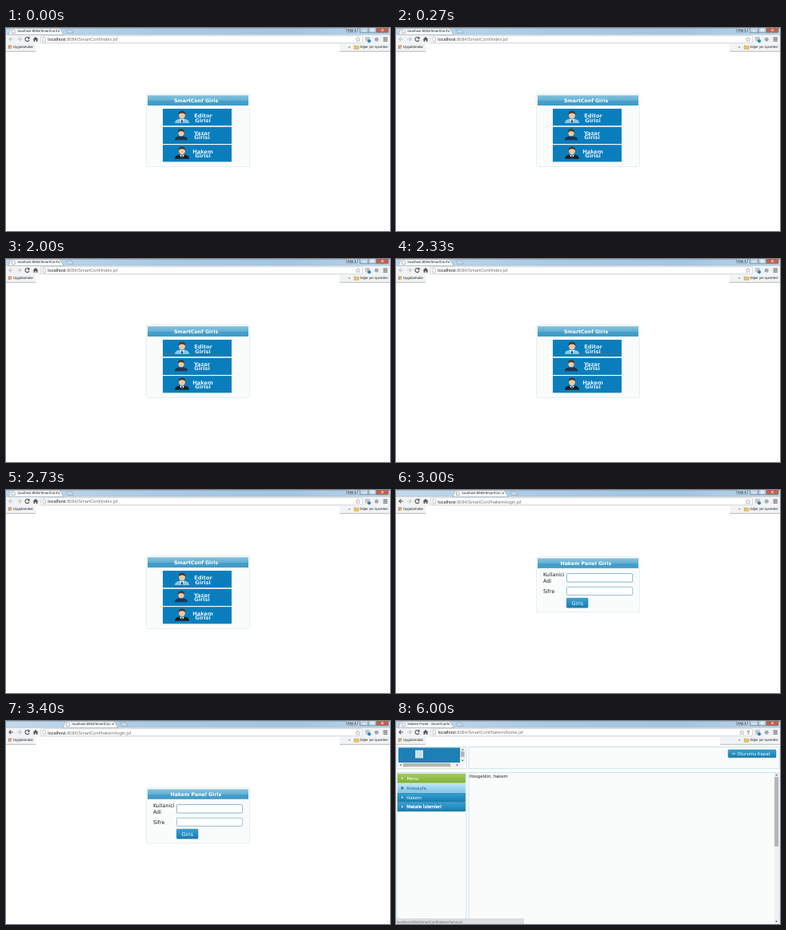
Animation of 480 by 254 pixels, one loop 8 s. Source, as an HTML page:

```html
<!DOCTYPE html>
<html lang="tr">
<head>
<meta charset="utf-8">
<title>Giris</title>
<style>
html, body { margin: 0; width: 100%; height: 100%; overflow: hidden; background: #fff; }
svg { display: block; width: 100vw; height: 100vh; }
text { font-family: "DejaVu Sans", sans-serif; text-rendering: geometricPrecision; white-space: pre; }
.ui { font-family: "Liberation Sans", Arial, sans-serif; font-size: 4.3px; fill: #222; }
.url { font-size: 5.65px; fill: #777; }
.url tspan { fill: #222; }
.head { font-size: 6.2px; font-weight: bold; fill: #fff; text-anchor: middle; }
.pic { font-size: 6.6px; font-weight: bold; fill: #e4f2fa; text-anchor: middle; }
.form { font-size: 6.4px; fill: #1c1c1c; }
.app { font-size: 5.35px; fill: #222; }
.light { fill: #fff; }
.strong { stroke: #fff; stroke-width: .25; }
.scene { opacity: 0; animation: 8s step-end infinite; }
#start { animation-name: start; }
#login { animation-name: login; }
#home { animation-name: home; }
@keyframes start { 0% { opacity: 1 } 37.5%, 100% { opacity: 0 } }
@keyframes login { 0% { opacity: 0 } 37.5% { opacity: 1 } 75%, 100% { opacity: 0 } }
@keyframes home { 0% { opacity: 0 } 75%, 100% { opacity: 1 } }
</style>
</head>
<body>
<svg viewBox="0 0 480 254" preserveAspectRatio="none">
<defs>
  <linearGradient id="glass">
    <stop offset="0" stop-color="#c3d9ec"/><stop offset=".4" stop-color="#a9c9e4"/>
    <stop offset=".75" stop-color="#a3c5e2"/><stop offset="1" stop-color="#bfd6ea"/>
  </linearGradient>
  <linearGradient id="bar" x2="0" y2="1">
    <stop offset="0" stop-color="#85c1dd"/><stop offset=".5" stop-color="#63b0d4"/>
    <stop offset=".52" stop-color="#459fc9"/><stop offset="1" stop-color="#3f9bc6"/>
  </linearGradient>
  <linearGradient id="btn" x2="0" y2="1">
    <stop offset="0" stop-color="#3a9fd0"/><stop offset=".5" stop-color="#2590c5"/>
    <stop offset="1" stop-color="#1b79aa"/>
  </linearGradient>
  <linearGradient id="hover" x2="0" y2="1">
    <stop offset="0" stop-color="#c4e6f5"/><stop offset=".5" stop-color="#9dd4ee"/>
    <stop offset="1" stop-color="#7fc5e8"/>
  </linearGradient>
  <linearGradient id="green" x2="0" y2="1">
    <stop offset="0" stop-color="#a5cc62"/><stop offset="1" stop-color="#7cb038"/>
  </linearGradient>

  <g id="tab">
    <path d="M0 8.5 3 1.2Q3.4 .5 4.5 .5H63Q64.3 .5 65 1.4L69 8.5Z" fill="#f7f9fa" stroke="#7f98aa" stroke-width=".5"/>
    <path d="M4.5 2h2.8l1 1v3.6H4.5Z" fill="#fff" stroke="#777" stroke-width=".5"/>
    <path d="m61.6 2.6 2.4 2.4m0-2.4-2.4 2.4" stroke="#555" stroke-width=".7"/>
    <path d="M72 2.2h7l2 4h-7Z" fill="#c9dcea" stroke="#7893a7" stroke-width=".5"/>
  </g>
  <path id="back" d="M9 14H4m2.3-2.4L3.9 14l2.4 2.4" fill="none" stroke-width="1.2"/>
  <path id="star" d="m0-3 .8 2 2.1.1-1.6 1.4.5 2.1L0 1.4l-1.8 1.2.5-2.1-1.6-1.4 2.1-.1Z" fill="#fff" stroke="#888" stroke-width=".5"/>
  <g id="person">
    <path d="M-9 9.8Q-9 5.5-3.5 4.5H3.5Q9 5.5 9 9.8Z"/>
    <ellipse cy="-.2" rx="4" ry="4.6" fill="#f0c8a0"/>
    <path d="M-4.3 0Q-5-5.6 0-5.6T4.3 0Q3.6-2.8 0-2.8T-4.3 0Z" fill="#4a3526"/>
  </g>
  <path id="dot" d="m0-1.6 2 1.6-2 1.6Z" fill="#e8f6fd"/>
</defs>

<!-- shared browser window -->
<rect width="480" height="254" fill="#fff"/>
<rect width="480" height="8.5" fill="url(#glass)"/>
<path d="M0 .2H480" stroke="#6e92ad" stroke-width=".6"/>
<rect y="8" width="480" height="21.5" fill="#f1f3f4"/>
<path d="M0 8.2H480" stroke="#92abbd" stroke-width=".5"/>
<path d="M0 29.3H480" stroke="#a3a3a3" stroke-width=".7"/>
<g stroke="#5c7a91" stroke-width=".6">
  <rect x="425.5" y="-1" width="14" height="6" rx="1" fill="#b3cbdd"/>
  <rect x="442.5" y="-1" width="10.5" height="6.8" fill="#bcd2e3"/>
  <rect x="453" y="-1" width="10" height="6.8" fill="#bcd2e3"/>
  <rect x="463" y="-1" width="15" height="6.8" rx="1" fill="#c2604f"/>
</g>
<text class="ui" x="427.3" y="3.7">Kişi 1</text>
<path d="M446 3.6h3.6M456.3 1.4h3.2v2.3h-3.2ZM469.1 1.2l2.8 2.8m0-2.8-2.8 2.8" fill="none" stroke="#fff" stroke-width=".9"/>
<path d="M28.6 12.4A2.6 2.6 0 1 0 29 15m0-3.7v2h-2" fill="none" stroke="#555" stroke-width="1.1"/>
<path d="M33.6 14.2 37 11l3.4 3.2h-1v2.8h-1.7v-2h-1.4v2h-1.7v-2.8Z" fill="#555"/>
<rect x="43.5" y="9.7" width="402" height="9" rx="1" fill="#fff" stroke="#c0c6ca" stroke-width=".6"/>
<path d="M46 11.5h2.4l1 1V17H46Z" fill="#fff" stroke="#888" stroke-width=".5"/>
<rect x="449" y="11" width="6" height="5.5" rx="1" fill="#c3c8cc"/>
<circle cx="454" cy="16.3" r="2.1" fill="#2786b8"/>
<circle cx="463.2" cy="14.2" r="2.5" fill="#a3a8b5"/>
<path d="M471.5 12.2h5.4m-5.4 2h5.4m-5.4 2h5.4" stroke="#555" stroke-width="1"/>
<g fill="#d8593e">
  <path d="M3 21.7h1.7v1.7H3Zm2.3 0H7v1.7H5.3Z"/>
  <path d="M3 24h1.7v1.7H3Z" fill="#5b9a50"/><path d="M5.3 24H7v1.7H5.3Z" fill="#e2ad3c"/>
</g>
<text class="ui" x="8.8" y="25.2" style="font-size:4.5px">Uygulamalar</text>
<path d="M435.3 22h2l.6.7h3v3.5h-5.6Z" fill="#f0c765" stroke="#b98a2c" stroke-width=".5"/>
<text class="ui" x="442.5" y="25.2">Diğer yer işaretleri</text>
<text class="ui" x="428" y="25.2">»</text>

<!-- role selection -->
<g id="start" class="scene">
  <use href="#tab" x="3"/>
  <text class="ui" x="14.5" y="5.4">localhost:8084/SmartConf</text>
  <use href="#back" stroke="#c3c6c8"/>
  <use href="#back" stroke="#c3c6c8" transform="matrix(-1 0 0 1 23 0)"/>
  <text class="ui url" x="52.3" y="16.1"><tspan>localhost</tspan>:8084/SmartConf/index.jsf</text>
  <use href="#star" x="440" y="14.3"/>
  <rect x="37" y="20" width="380" height="10" fill="#fff"/>
  <rect x="175.5" y="82.5" width="129" height="91" rx="1" fill="#fafcfc" stroke="#e0ebef" stroke-width=".8"/>
  <rect x="177" y="84.2" width="126" height="12.8" fill="url(#bar)"/>
  <text class="head" x="237.5" y="93.2">SmartConf Giris</text>
  <g fill="#0a7ebd">
    <rect x="196" y="101" width="86" height="21.2"/>
    <rect x="196" y="123.8" width="86" height="21.2"/>
    <rect x="196" y="146.2" width="86" height="21.2"/>
  </g>
  <use href="#person" x="220" y="109.3" fill="#8cc6e8"/>
  <path d="m217 114 3 4.5 3-4.5Z" fill="#fff"/><path d="m219.4 114.4h1.2l.6 3-1.2 1.4-1.2-1.4Z" fill="#27425e"/>
  <g transform="translate(219 131.4) scale(.9)"><use href="#person" fill="#20344f"/></g>
  <use href="#person" x="220" y="154" fill="#1b1f26"/>
  <path d="m217 158.7 3 4.6 3-4.6Z" fill="#fff"/><path d="m219.5 159h1l.5 3-1 1.4-1-1.4Z" fill="#20242c"/>
  <text class="pic" x="246.5" y="112">Editor</text><text class="pic" x="246" y="117.6">Girisi</text>
  <text class="pic" x="245" y="134">Yazar</text><text class="pic" x="245" y="139.4">Girisi</text>
  <text class="pic" x="246" y="156.8">Hakem</text><text class="pic" x="246" y="162.3">Girisi</text>
</g>

<!-- login form -->
<g id="login" class="scene">
  <use href="#tab" x="71"/>
  <text class="ui" x="82.5" y="5.4">localhost:8084/SmartCon</text>
  <use href="#back" stroke="#555"/>
  <use href="#back" stroke="#c3c6c8" transform="matrix(-1 0 0 1 23 0)"/>
  <text class="ui url" x="52.3" y="16.6"><tspan>localhost</tspan>:8084/SmartConf/hakem/login.jsf</text>
  <use href="#star" x="440" y="14.8"/>
  <rect x="37" y="20" width="380" height="10" fill="#fff"/>
  <rect x="175.5" y="83.5" width="129" height="69.5" rx="1" fill="#fafcfc" stroke="#e3edf0" stroke-width=".8"/>
  <rect x="177" y="85.4" width="126" height="12.4" fill="url(#bar)"/>
  <text class="head" x="237.3" y="94">Hakem Panel Giris</text>
  <text class="form" x="184" y="108.3">Kullanici</text>
  <text class="form" x="184" y="116">Adi</text>
  <text class="form" x="184" y="128.7">Sifre</text>
  <rect x="213.4" y="104.6" width="82.3" height="10.5" rx="1" fill="#fff" stroke="#6ba3c4" stroke-width=".8"/>
  <rect x="213.4" y="121.3" width="82.3" height="10.2" rx="1" fill="#fff" stroke="#86b2ca" stroke-width=".8"/>
  <rect x="213.2" y="135.3" width="26.8" height="12" rx="1" fill="url(#btn)" stroke="#24749e" stroke-width=".5"/>
  <text class="form light" x="219.6" y="143.6">Giris</text>
</g>

<!-- panel home -->
<g id="home" class="scene">
  <use href="#tab" x="3"/>
  <text class="ui" x="14.5" y="5.4">Hakem Panel - SmartConf</text>
  <use href="#back" stroke="#555"/>
  <use href="#back" stroke="#c3c6c8" transform="matrix(-1 0 0 1 23 0)"/>
  <text class="ui url" x="52.5" y="16.4"><tspan>localhost</tspan>:8084/SmartConf/hakem/home.jsf</text>
  <use href="#star" x="432.5" y="14.5"/>
  <path d="M438 12h5l-1.7 2.4v2.5h-1.6v-2.5Z" fill="#a9b0b5"/>
  <rect x="37" y="20" width="368" height="10" fill="#fff"/>
  <g fill="#fafcfc" stroke="#b5d6e4" stroke-width=".7">
    <rect x="1" y="32.3" width="87" height="27.5"/>
    <rect x="91" y="32.3" width="388" height="27.5"/>
    <rect x="1" y="64.6" width="87" height="195"/>
    <rect x="91" y="64.6" width="388" height="195"/>
  </g>
  <rect x="3" y="33.4" width="77" height="18.6" fill="#1d80b4"/>
  <rect x="24" y="36.5" width="10" height="10" fill="#cfe0e6"/>
  <g fill="#eef0f1">
    <rect x="80" y="33.4" width="6.5" height="18.6"/>
    <rect x="3" y="52" width="77" height="6"/>
    <rect x="472.7" y="65" width="5.8" height="189"/>
  </g>
  <g fill="#b3b5b6">
    <rect x="80.9" y="38" width="4.6" height="7"/>
    <rect x="9" y="52.8" width="59" height="4.4"/>
    <rect x="473.1" y="70" width="5" height="87"/>
  </g>
  <path d="m81.7 36.5 1.5-1.7 1.5 1.7ZM81.7 48.8l1.5 1.7 1.5-1.7ZM6.6 53.5 5 55l1.6 1.5ZM75.8 53.5l1.6 1.5-1.6 1.5ZM474.1 68.2l1.5-1.7 1.5 1.7ZM474.1 250l1.5 1.7 1.5-1.7Z" fill="#555"/>
  <rect x="415.2" y="36" width="59.8" height="9.8" rx="1" fill="url(#btn)" stroke="#24749e" stroke-width=".5"/>
  <path d="M419.5 41h4m-1.6-1.5 1.6 1.5-1.6 1.5" fill="none" stroke="#d9effa" stroke-width=".7"/>
  <text class="app light" x="426.5" y="42.9">Oturumu Kapat</text>
  <rect x="2" y="66" width="84.7" height="11.3" fill="url(#green)" stroke="#79a83c" stroke-width=".4"/>
  <rect x="2" y="78" width="84.7" height="11.4" fill="url(#hover)"/>
  <g fill="url(#btn)" stroke="#1d6f9c" stroke-width=".5">
    <rect x="2" y="90" width="84.7" height="11.2"/>
    <rect x="2" y="101.8" width="84.7" height="11.2"/>
  </g>
  <use href="#dot" x="7" y="71.7"/>
  <path d="m5.6 83.7 2.2-2 2.2 2h-.8v1.8H6.4v-1.8Z" fill="#347da3"/>
  <use href="#dot" x="7" y="95.6"/>
  <use href="#dot" x="7" y="107.3"/>
  <text class="app light" x="13.5" y="73.6">Menu</text>
  <text class="app" x="13" y="85.6" style="fill:#22688f">Anasayfa</text>
  <text class="app light" x="13.2" y="97.5">Hakem</text>
  <text class="app light strong" x="13.2" y="109.2">Makale İslemleri</text>
  <text class="app" x="91.8" y="71.2">Hosgeldin, hakem</text>
  <path d="M0 247.5H158.5Q159.5 247.5 159.5 248.5V254H0Z" fill="#dddfe1" stroke="#c3c6c9" stroke-width=".5"/>
  <text class="ui" x="1" y="252.6" style="font-size:4.35px;fill:#666">localhost:8084/SmartConf/hakem/home.jsf</text>
</g>
</svg>
</body>
</html>
```
